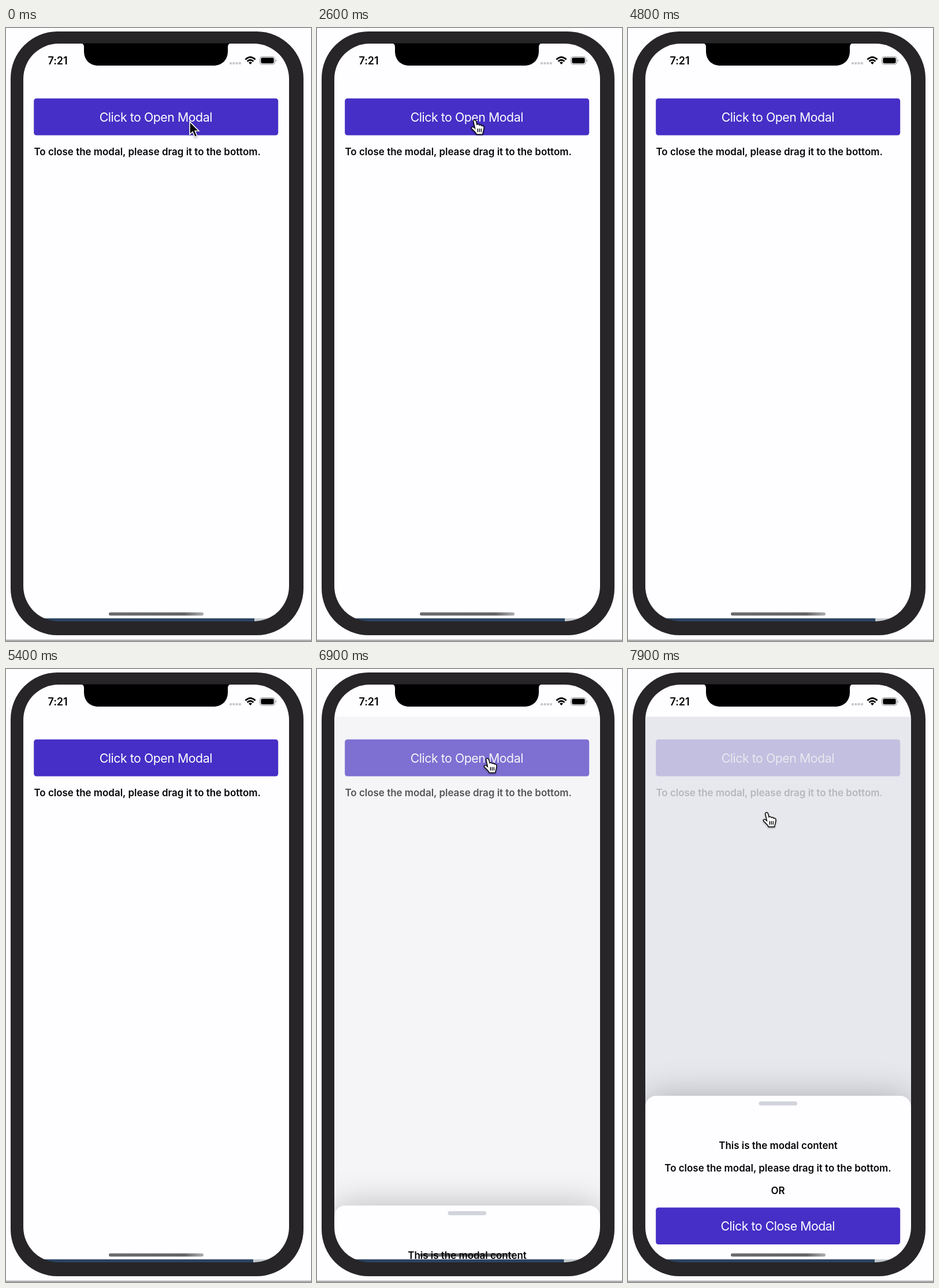
Recreate the animation shown at these times as an HTML page. Size 528 by 1060 pixels, loop 8 s.

```html
<!DOCTYPE html>
<html lang="en">
<head>
<meta charset="utf-8">
<title>Modal demo</title>
<style>
  html, body { margin: 0; width: 100%; height: 100%; overflow: hidden; background: #fefdff; }
  svg { display: block; width: 100vw; height: 100vh; }
  text { font-family: Inter, "Open Sans", sans-serif; }
  .label { font-size: 21.3px; letter-spacing: -.45px; fill: #fff; text-anchor: middle; }
  .bold { font-size: 16.95px; font-weight: 600; fill: #050505; }
  .mid { text-anchor: middle; }
  .btn { fill: #462fc6; }
  #shadow { filter: blur(30px); }
  #home { mix-blend-mode: multiply; }
  #cursor { filter: drop-shadow(0 1.5px 1.5px rgba(0, 0, 0, .4)); }
</style>
</head>
<body>
<svg viewBox="0 0 528 1060">
  <defs>
    <clipPath id="screen"><rect x="30" y="27" width="460" height="999" rx="61"/></clipPath>
    <linearGradient id="grey">
      <stop offset="0" stop-color="#6b6d6f"/>
      <stop offset=".8" stop-color="#636567"/>
      <stop offset="1" stop-color="#aeb0b2"/>
    </linearGradient>
  </defs>

  <rect width="528" height="1060" fill="#fefdff"/>
  <rect y="1058" width="528" height="1.2" fill="#6e6d70"/>
  <rect x="8" y="6" width="507" height="1044" rx="81" fill="#272528"/>

  <g clip-path="url(#screen)">
    <rect x="30" y="27" width="460" height="999" fill="#fefdff"/>
    <g id="open">
      <rect class="btn" x="48.2" y="121.8" width="423" height="63.8" rx="4.5"/>
      <text class="label" x="259.3" y="161.9">Click to Open Modal</text>
    </g>
    <text class="bold" x="48.5" y="220.3">To close the modal, please drag it to the bottom.</text>
    <rect id="dim" x="30" y="82.5" width="460" height="944" fill="#e2e4e9"/>

    <g id="sheet">
      <rect id="shadow" x="30" width="460" height="420" rx="20"/>
      <rect x="30" width="460" height="420" rx="19" fill="#fefdff"/>
      <rect x="226.5" y="9.8" width="66.5" height="7" rx="3.5" fill="#d1d4da"/>
      <text class="bold mid" x="260" y="92">This is the modal content</text>
      <text class="bold mid" x="259.5" y="131">To close the modal, please drag it to the bottom.</text>
      <text class="bold mid" x="259.5" y="170">OR</text>
      <rect class="btn" x="48.2" y="193.3" width="423" height="63.8" rx="4.5"/>
      <text class="label" x="259.3" y="233.3">Click to Close Modal</text>
    </g>

    <rect id="home" x="178" y="1010.5" width="164" height="5.5" rx="2.7" fill="url(#grey)"/>
    <rect x="30" y="1020.8" width="460" height="6" fill="#c5cbd0"/>
    <rect id="bar" x="30" y="1020.8" height="6" fill="#2b4462"/>
  </g>

  <path d="M130 26.5Q135 27 135 33V40C135 55 145 65 160 65H359C374 65 384 55 384 40V33Q384 27 389 26.5Z"/>
  <text x="72.5" y="63.2" font-size="18" font-weight="600" letter-spacing="-.1">7:21</text>
  <g fill="#c9c8cb">
    <rect x="387" y="59" width="4" height="4" rx="1.2"/>
    <rect x="392.3" y="59" width="4" height="4" rx="1.2"/>
    <rect x="397.6" y="59" width="4" height="4" rx="1.2"/>
    <rect x="402.9" y="59" width="4" height="4" rx="1.2"/>
  </g>
  <g fill="none" stroke="#000" stroke-width="2.8">
    <path d="M414.4 54.4Q423 46.3 431.6 54.4M417.6 57.8Q423 52.7 428.4 57.8"/>
    <path d="M420 59.8Q423 57.4 426 59.8L423 63Z" fill="#000" stroke="none"/>
  </g>
  <rect x="439.5" y="49.5" width="26" height="13.5" rx="4" fill="none" stroke="#8f8e91"/>
  <rect x="441.3" y="51.3" width="22.4" height="9.9" rx="2.4"/>
  <path d="M467 54Q469.2 56.2 467 58.6Z" fill="#8f8e91"/>

  <g id="cursor">
    <path id="arrow" d="M0 0V22L5 17.5L9 26.5L13 24.8L9.2 16H16Z" stroke="#fff" stroke-width="1.6"/>
    <g id="hand" stroke="#000" stroke-width="1.4" stroke-linecap="round">
      <path fill="#fff" d="M4.6 3C5 .3 8.6 .2 9.4 3L11 9C12 7.9 14.5 8.1 15 10C16.5 9 18.5 9.4 19 11.2C21 10.5 23 11.5 23 14C23 19 21.2 21 20.6 26H10.2C9 22 5 20 1.5 15.7C.4 13 3.6 11.8 7.4 15.4Z"/>
      <path d="M12.3 16.5V21.5M15.3 16.5V21.5M18.3 16.5V21.5"/>
    </g>
  </g>
</svg>
<script>
  const el = id => document.getElementById(id);
  const LOOP = 8000, HIDE = 4800, PRESS = 6000, OPEN = 6900;

  // cursor stops: time, x, y
  const path = [
    [0, 318, 162], [500, 284, 148], [600, 284, 148], [800, 268, 146.5],
    [1900, 268, 146.5], [2400, 266, 158], [HIDE, 266, 158], [PRESS, 288, 153.5],
    [7700, 288, 153.5], [7900, 233, 247]
  ];

  function place(t) {
    const i = path.findIndex(p => p[0] > t);
    if (i < 0) return path[path.length - 1].slice(1);
    const [t0, x0, y0] = path[i - 1], [t1, x1, y1] = path[i];
    const k = (t - t0) / (t1 - t0);
    return [x0 + (x1 - x0) * k, y0 + (y1 - y0) * k];
  }

  function progress(t) {
    if (t < PRESS) return 0;
    if (t < OPEN) return .01;
    return 1 - .66 * Math.exp((OPEN - t) / 90);
  }

  function show(id, on) {
    el(id).style.display = on ? "" : "none";
  }

  function draw(t) {
    const p = progress(t), [x, y] = place(t);
    el("open").setAttribute("opacity", t >= PRESS && t < OPEN ? .65 : 1);
    el("dim").setAttribute("opacity", .8 * p ** .75);
    el("sheet").setAttribute("transform", `translate(0 ${1025.5 - 287.5 * p})`);
    el("shadow").setAttribute("opacity", .25 * Math.min(1, .1 + p * 3));
    el("bar").setAttribute("width", 400 - 3 * t / LOOP);
    el("cursor").setAttribute("transform", `translate(${x} ${y})`);
    show("sheet", p > 0);
    show("cursor", t < HIDE || t >= PRESS);
    show("arrow", t < 100);
    show("hand", t >= 100);
  }

  const start = performance.now();
  function tick() {
    const t = (performance.now() - start) % LOOP;
    draw(Math.floor(t / 100) * 100);
    requestAnimationFrame(tick);
  }
  tick();
</script>
</body>
</html>
```
